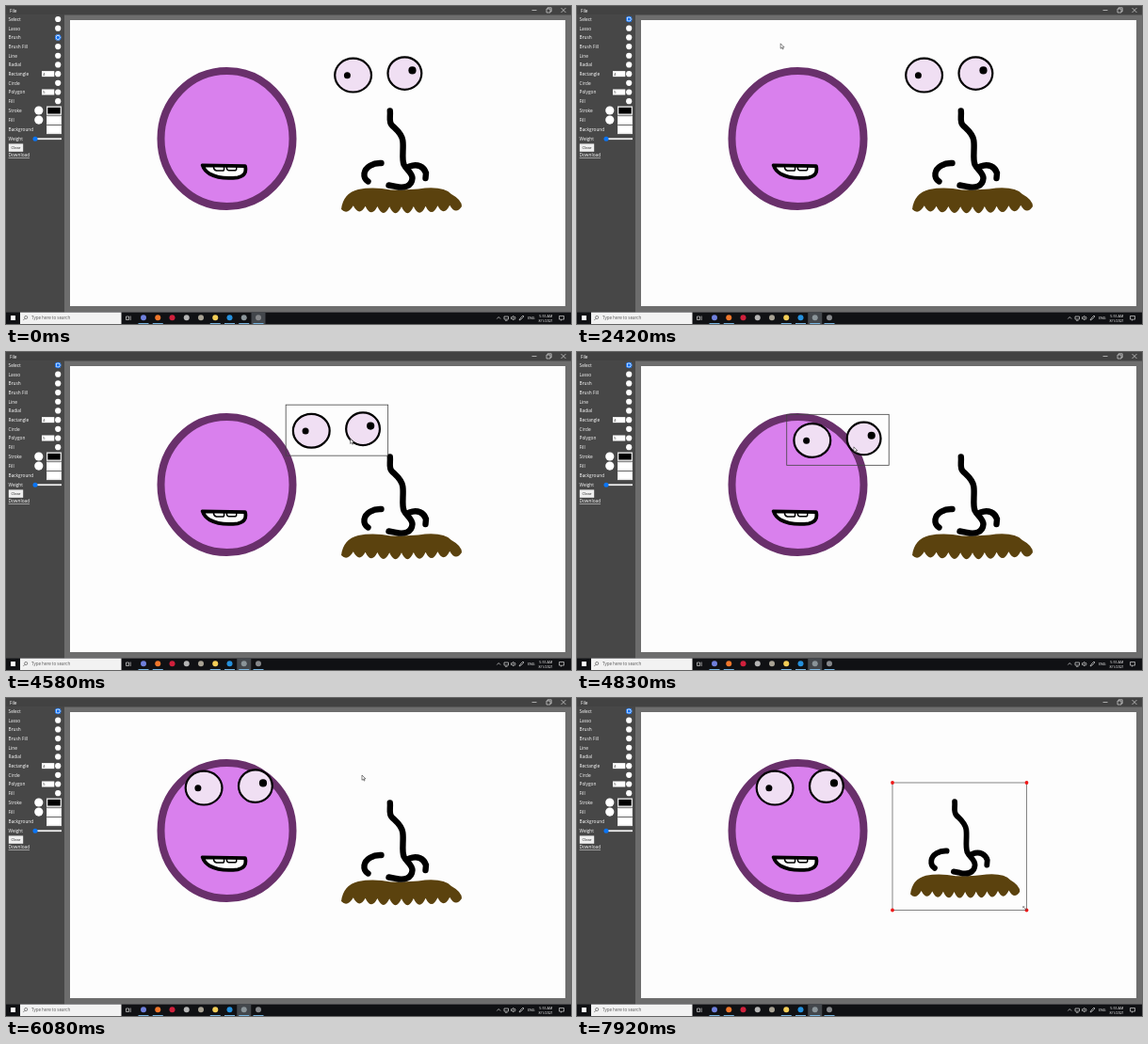
Recreate the animation shown at these times as an HTML page. Size 600 px wide and 338 px high, loop 8 s.

```html
<!DOCTYPE html>
<html lang="en">
<head>
<meta charset="utf-8">
<title>Drawing app</title>
<style>
html, body { margin: 0; width: 100%; height: 100%; overflow: hidden; background: #6d6d6d; }
svg { display: block; width: 100%; height: 100%; }
text { font: 500 4.75px "Open Sans", "Noto Sans", sans-serif; fill: #fff; }
.small { font-size: 3.7px; text-anchor: middle; }
.line { fill: none; stroke: #000; stroke-linecap: round; stroke-linejoin: round; }
.thin { fill: none; stroke: #d8d8d8; stroke-width: .7; }
</style>
</head>
<body>
<svg viewBox="0 0 600 338" xmlns="http://www.w3.org/2000/svg">
  <rect width="600" height="338" fill="#6d6d6d"/>
  <rect width="600" height="9.5" fill="#424242"/>
  <rect y="9" width="62" height="317" fill="#474747"/>
  <rect x="68" y="15" width="526" height="304" fill="#fdfdfd"/>
  <text x="4" y="6.8">File</text>
  <path class="thin" d="M558.5 4.5h5M574 3h4v4h-4zM575.2 3v-1.2h4v4h-1.2M589.5 2l5 5m0-5l-5 5"/>
  <g id="panel"></g>

  <ellipse cx="234.5" cy="141" rx="70" ry="72" fill="#d980ed" stroke="#69306b" stroke-width="8"/>
  <path class="line" style="fill:#fff" stroke-width="3.8" d="M208.7 169.3L254 170.2C255.5 177 253 181 246 182.3C232 184 222 181.5 216.5 178.5Q210.5 175 208.7 169.3Z"/>
  <path class="line" stroke-width="1.5" d="M220.5 171Q220.5 174.5 223.5 175L231 175Q232 174 231.5 171M234.5 171Q234 174.5 236.5 174.7L244 174.7Q245 174 244.8 171"/>

  <g id="nose">
    <path id="tache" fill="#5b420e"/>
    <path class="line" stroke-width="6.4" d="M407.8 111.5C408.5 118 406 123 410 127C414 131 420 135 421.3 143C422.5 152 420 162 422.5 168.5C425 174 431.5 177 431.5 183C431 192 422 194 414 191.8L406.5 190.5M398.5 167C390 166.5 381.5 171 380.5 178C380 182 382 185 384.5 186.5M428.5 170.5C437 167 444 171 446 177.5L445.5 183"/>
  </g>

  <g id="eyes">
    <g fill="#f0dff3" stroke="#000" stroke-width="2.2">
      <ellipse cx="368.6" cy="73.6" rx="19.4" ry="17.9"/>
      <ellipse cx="423.4" cy="71.6" rx="17.9" ry="17.3"/>
    </g>
    <circle cx="362.4" cy="73.8" r="3.5"/>
    <circle cx="431.5" cy="68.4" r="4.1"/>
  </g>

  <g id="box">
    <rect fill="none" stroke-width=".8"/>
    <g id="grips" fill="#f01818"></g>
  </g>

  <rect y="325.6" width="600" height="13" fill="#101114"/>
  <rect x="15" y="325.6" width="107.5" height="12.4" fill="#f2f2f2"/>
  <rect x="5" y="329" width="5" height="5" fill="#fff"/>
  <g style="stroke:#444;fill:none;stroke-width:.6"><circle cx="21.2" cy="331" r="1.6"/><path d="M20 332.2l-1.7 1.8"/></g>
  <text x="27" y="333.4" style="font-size:4.5px;fill:#555">Type here to search</text>
  <rect id="focus" y="325.6" width="15" height="12.4" fill="#43474c"/>
  <path class="thin" d="M127.5 330h3v3.5h-3zM132.2 329.5v4.5"/>
  <g id="apps"></g>
  <path class="thin" d="M521.3 332.5l1.9-2 1.9 2M529 330h4.5v3h-4.5zM530 334.3h2.5M536.5 330.7h1l1.5-1.3v4.5l-1.5-1.3h-1zM540.3 330q1.4 1.6 0 3.3M545 334l1-2 3-3 1 1-3 3zM587.5 329.5h5v3.6h-2l-1 1.2v-1.2h-2z"/>
  <text class="small" x="557.7" y="333">ENG</text>
  <text class="small" x="573.3" y="330.8">5:55 AM</text>
  <text class="small" x="573.3" y="336.4">8/1/2021</text>

  <path id="arrow" d="M0 0V5.3L1.3 4.2 2.2 6.1 3 5.7 2.2 3.9H3.9Z" fill="#fff" stroke="#222" stroke-width=".55"/>
  <path id="sizer" d="M.2 1.9V.2H1.9M.2 .2L3.6 3.6M3.6 1.9V3.6H1.9" fill="none" stroke="#555" stroke-width=".6"/>
</svg>
<script>
const $ = id => document.getElementById(id);
const LOOP = 8000, FPS = 12;

// Side panel
const tools = ['Select', 'Lasso', 'Brush', 'Brush Fill', 'Line', 'Radial', 'Rectangle', 'Circle', 'Polygon', 'Fill'];
const row = i => 14 + i * 9.69;
const label = (s, y, extra = '') => `<text x="2.6" y="${y}" ${extra}>${s}</text>`;
const dot = (x, y, r, fill) => `<circle cx="${x}" cy="${y}" r="${r}" fill="${fill}"/>`;
const rect = (x, y, w, h, fill) => `<rect x="${x}" y="${y}" width="${w}" height="${h}" fill="${fill}"/>`;
const input = (y, n) => rect(38, y - 3, 13.3, 6, '#fff') +
  `<text x="39.3" y="${y + 1.4}" style="font-size:4px;fill:#222">${n}</text>`;

let html = tools.map((name, i) => label(name, row(i) + 1.9) + dot(55.2, row(i), 3.1, '#fff')).join('');
html += `<g id="radio">${dot(55.2, 0, 3.2, '#0a6cf0') + dot(55.2, 0, 2.4, '#fff') + dot(55.2, 0, 1.7, '#0a6cf0')}</g>`;
html += input(row(6), 4) + input(row(8), 5);
['Stroke', 'Fill', 'Background'].forEach((name, i) => {
  const y = 106.5 + i * 10.1;
  html += label(name, y + 6.4) + rect(43, y, 16, 9.4, '#e6e6e6') + rect(44.3, y + 1.4, 13.4, 6.6, i ? '#fff' : '#000');
  if (i < 2) html += dot(34.8, y + 4.5, 4.6, '#fff');
});
html += label('Weight', 143.2) + rect(29, 140.3, 30, 1.8, '#eee') + dot(31, 141.2, 2.5, '#0a75f5') +
  rect(2.8, 146.4, 15.4, 8.4, '#efefef') +
  `<text x="10.5" y="152.1" text-anchor="middle" style="font-size:4.2px;fill:#222">Clear</text>` +
  label('Download', 160.3, 'text-decoration="underline"');
$('panel').innerHTML = html;

// Taskbar apps, evenly spaced; the middle three are not running
const appX = i => 146 + i * 15.25;
const appColors = ['#6f80dc', '#f0772b', '#d0203c', '#b4b4b4', '#a8a294', '#f2cd57', '#2590dc', '#8a9499', '#85878a'];
$('apps').innerHTML = appColors.map((c, i) =>
  dot(appX(i), 331.3, 3, c) + (i < 2 || i > 4 ? rect(appX(i) - 5.5, 337, 11, 1, '#76b4e0') : '')).join('');

// Moustache: smooth top, ten round teeth below
let tache = 'M356 216Q358 199 374 195Q390 192 409 195.5Q432 195.5 445 193.5Q466 192 473 200Q484 206 484 213';
const TEETH = 10, toothW = 12.8;
for (let i = 0; i < TEETH; i++) {
  const x = 484 - i * toothW, sag = 3.5 * Math.sin(Math.PI * (i + .5) / TEETH);
  tache += `Q${x - toothW / 2} ${222 + sag * 1.5} ${x - toothW} ${i < TEETH - 1 ? 211.5 + sag / 2 : 216}`;
}
$('tache').setAttribute('d', tache + 'Z');

// Pointer strokes: start, end, goal, sideways bow
const moves = [
  { from: 1250, to: 1917, x: 56, y: 14, bow: 0 },
  { from: 2083, to: 2700, x: 341.5, y: 46, bow: 8 },
  { from: 2917, to: 3700, x: 450, y: 100, bow: -1 },
  { from: 3833, to: 4150, x: 429, y: 79, bow: 0 },
  { from: 4250, to: 5020, x: 270.5, y: 101, bow: 4.5 },
  { from: 5500, to: 5900, x: 378, y: 82, bow: 0 },
  { from: 6083, to: 6390, x: 335, y: 90, bow: 0 },
  { from: 6417, to: 7000, x: 492, y: 234, bow: 8 },
  { from: 7583, to: 7917, x: 477.5, y: 225.5, bow: 0 }
];
const [, , band, , grab, , , , resize] = moves;

const ease = p => p * p * (3 - 2 * p);
function pointer(t) {
  let x = 254, y = 328;
  for (const m of moves) {
    const p = Math.min(1, Math.max(0, (t - m.from) / (m.to - m.from))), e = ease(p);
    x += (m.x - x) * e;
    y += (m.y - y) * e + m.bow * Math.sin(Math.PI * p);
  }
  return [x, y];
}

const show = (el, on) => el.setAttribute('display', on ? 'inline' : 'none');
const move = (el, x, y) => el.setAttribute('transform', `translate(${x} ${y})`);
const frame = $('box').querySelector('rect');
function drawBox(x, y, x2, y2, grips, color) {
  const set = { x, y, width: x2 - x, height: y2 - y, stroke: color };
  for (const k in set) frame.setAttribute(k, set[k]);
  $('grips').innerHTML = grips
    ? [[x, y], [x2, y], [x, y2], [x2, y2]].map(([a, b]) => dot(a, b, 1.9, '#f01818')).join('')
    : '';
}

function draw(t) {
  const [px, py] = pointer(t), resizing = t > 7240;
  show($('arrow'), t > 990 && !resizing);
  show($('sizer'), resizing);
  move($('arrow'), px, py);
  move($('sizer'), px - 4, py - 4);

  move($('radio'), 0, row(t < 1910 ? 2 : 0));
  $('focus').setAttribute('x', appX(t < 990 ? 8 : 7) - 7.5);

  // The dragged shape trails the pointer a little
  const [gx, gy] = pointer(Math.min(Math.max(t - 65, grab.from), grab.to));
  const dx = gx - 429, dy = gy - 79;
  move($('eyes'), dx, dy);

  const sx = t > resize.from ? (px - 335) / 157 : 1, sy = t > resize.from ? (py - 90) / 144 : 1;
  $('nose').setAttribute('transform', `translate(335 90) scale(${sx} ${sy}) translate(-335 -90)`);

  const first = t > 2990 && t < 5825, second = t > 6410;
  show($('box'), first || second);
  if (first) {
    const [x2, y2] = pointer(Math.min(t, band.to)), held = t < 3825;
    const grips = !held && t < grab.from || t > 5490;
    drawBox(341.5 + dx, 46 + dy, x2 + dx, y2 + dy, grips, held ? '#777' : '#444');
  } else if (second) {
    const done = t > 7160, [x2, y2] = pointer(done ? t : t - 10);
    drawBox(335, 90, x2, y2, done, done ? '#666' : '#888');
  }
}

function tick(now) {
  const step = Math.floor((now % LOOP) * FPS / 1000 + .1);
  draw(step * 1000 / FPS % LOOP);
  requestAnimationFrame(tick);
}
draw(0);
requestAnimationFrame(tick);
</script>
</body>
</html>
```
